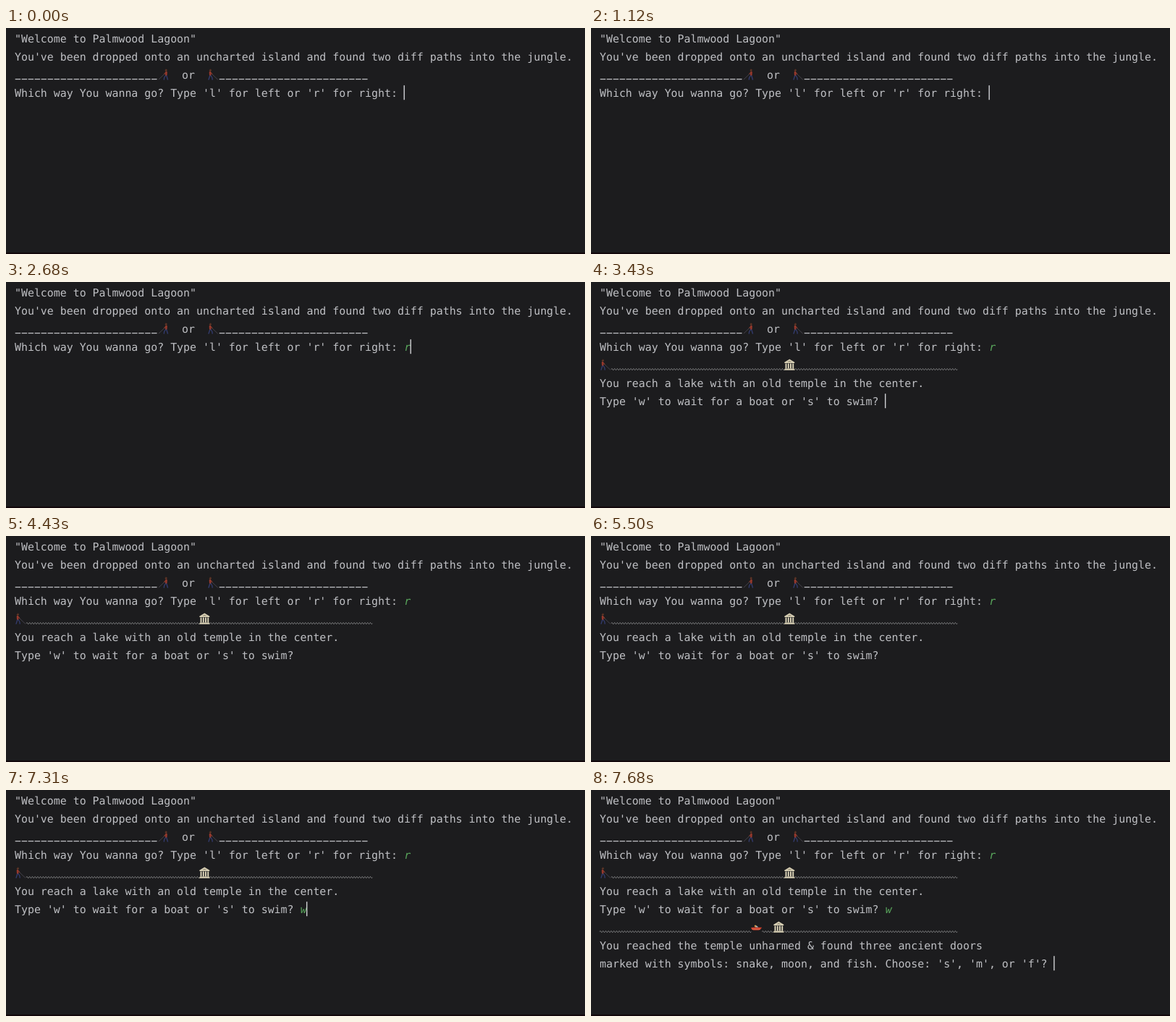
Write an HTML page that moves like this. It is 800 px wide and 312 px high and loops after 8000 ms.

```html
<!DOCTYPE html>
<html lang="en">
<head>
<meta charset="utf-8">
<title>Text adventure</title>
<style>
  html, body { margin: 0; width: 100%; height: 100%; overflow: hidden; background: #1c1c1e; }
  svg { display: block; width: 100vw; height: 100vh; }
  text {
    font: 14.9px "DejaVu Sans Mono", "Noto Sans Mono", monospace;
    text-rendering: geometricPrecision;
    fill: #bfc0c4;
    white-space: pre;
  }
  .typed { fill: #59a65c; font-style: italic; }
  .rule { stroke: #bfc0c4; stroke-width: 1.2; fill: none; }
  .wave { stroke: #a0a1a3; stroke-width: .8; fill: none; }
</style>
</head>
<body>
<svg viewBox="0 0 800 312" xmlns="http://www.w3.org/2000/svg">
  <defs>
    <g id="walker" fill="none" stroke-linecap="round">
      <path d="M6 -7 L14.4 1" stroke="#615c69" stroke-width=".6"/>
      <path d="M4 -5 L2 1.2 M4.6 -5 L6.8 -1.6 L7.2 1.2" stroke="#343c70" stroke-width="1.3"/>
      <path d="M4 -9 L4.2 -5.6" stroke="#98382c" stroke-width="2.6"/>
      <path d="M4.6 -8.8 L6.8 -6.6" stroke="#8c3b2c" stroke-width="1.1"/>
      <circle cx="4.3" cy="-11.8" r="1.4" fill="#6b3b29"/>
      <path d="M3 -12.3 Q3.8 -13.9 5.4 -13" stroke="#30221f" stroke-width="1"/>
    </g>
    <g id="temple" fill="#d8d0b5">
      <path d="M.3 -9.3 L7.3 -13.6 L14.3 -9.3 V-8 H.3 Z"/>
      <path d="M1.5 -7.4 h2 V-.6 h-2 Z M4.8 -7.4 h2 V-.6 h-2 Z M8 -7.4 h2 V-.6 h-2 Z M11.2 -7.4 h2 V-.6 h-2 Z"/>
      <path d="M.8 -.6 H13.9 V.5 H14.6 V1.8 H0 V.5 H.8 Z"/>
      <path d="M4 -9.4 L7.3 -11.6 L10.6 -9.4 Z" fill="#9c947d"/>
    </g>
    <g id="boat">
      <path d="M0 -5 L5 -5.6 L15.2 -5.2 Q13 -1.6 10.5 -1.4 H3 Q1 -2 0 -5 Z" fill="#cf3f2a"/>
      <path d="M1.2 -2.9 H12.8" stroke="#e8876b" stroke-width=".7"/>
      <path d="M6 -5.4 L7.5 -8 L10.4 -5.4 Z" fill="#a9bcc5"/>
      <circle cx="6" cy="-7.3" r="1.2" fill="#d6a24c"/>
    </g>
  </defs>
  <rect width="800" height="312" fill="#1c1c1e"/>
  <rect y="310" width="800" height="2" fill="#12070b"/>
  <g id="screen"></g>
  <rect id="caret" width="1.4" height="20" fill="#d0d1d4"/>
</svg>
<script>
const LOOP = 8000, LEFT = 12, CELL = 8.97, EM = 14.95;
const screen = document.getElementById("screen");
const caret = document.getElementById("caret");
const baseline = row => 20 + row * 25;
const column = n => LEFT + n * CELL;

// Each part becomes visible at its own time.
const parts = [];
function add(start, tag, attrs, content = "") {
  const node = document.createElementNS("http://www.w3.org/2000/svg", tag);
  for (const key in attrs) node.setAttribute(key, attrs[key]);
  node.textContent = content;
  screen.append(node);
  parts.push({ node, start });
}
const write = (start, row, content, x = LEFT, cls = "") =>
  add(start, "text", { x, y: baseline(row), class: cls }, content);

const icon = (start, row, name, x, flip = 1) =>
  add(start, "use", { href: "#" + name, transform: `translate(${x} ${baseline(row)}) scale(${flip} 1)` });

const dashes = (row, x, count) =>
  add(0, "path", {
    class: "rule",
    d: `M${x + 0.7} ${baseline(row) + 0.6}h${count * CELL - 1.4}`,
    "stroke-dasharray": `7.5 ${CELL - 7.5}`
  });

function water(start, row, x, count) {
  const q = EM / 16;
  const ripple = `q${q} -2.2 ${2 * q} 0q${q} 2.2 ${2 * q} 0`;
  add(start, "path", { class: "wave", d: `M${x} ${baseline(row) + 0.6}` + ripple.repeat(count * 4) });
}

const TYPE_R = 1680, LAKE = 2990, TYPE_W = 6180, DOORS = 7440;

write(0, 0, '"Welcome to Palmwood Lagoon"');
write(0, 1, "You've been dropped onto an uncharted island and found two diff paths into the jungle.");
dashes(2, LEFT, 22);
icon(0, 2, "walker", 225.5, -1);
write(0, 2, "or", 243);
icon(0, 2, "walker", 278);
dashes(2, 294, 23);
write(0, 3, "Which way You wanna go? Type 'l' for left or 'r' for right:");
write(TYPE_R, 3, "r", column(60), "typed");

icon(LAKE, 4, "walker", LEFT);
water(LAKE, 4, 28, 16);
icon(LAKE, 4, "temple", 267);
water(LAKE, 4, 282, 15);
write(LAKE, 5, "You reach a lake with an old temple in the center.");
write(LAKE, 6, "Type 'w' to wait for a boat or 's' to swim?");
write(TYPE_W, 6, "w", column(44), "typed");

water(DOORS, 7, LEFT, 14);
icon(DOORS, 7, "boat", 221);
water(DOORS, 7, 236.5, 1);
icon(DOORS, 7, "temple", 252);
water(DOORS, 7, 267, 16);
write(DOORS, 8, "You reached the temple unharmed & found three ancient doors");
write(DOORS, 9, "marked with symbols: snake, moon, and fish. Choose: 's', 'm', or 'f'?");

// Caret: shown from, until, row, column
const blinks = [
  [0, 180, 3, 60], [740, 1250, 3, 60],
  [TYPE_R, 2180, 3, 61], [2680, LAKE, 3, 61],
  [LAKE, 3500, 6, 44], [3980, 4430, 6, 44], [4930, 5440, 6, 44], [5930, TYPE_W, 6, 44],
  [TYPE_W, 6680, 6, 45], [7180, DOORS, 6, 45],
  [DOORS, LOOP, 9, 70]
];

function draw(t) {
  for (const { node, start } of parts) node.style.display = t >= start ? "" : "none";
  const blink = blinks.find(([from, until]) => t >= from && t < until);
  caret.style.display = blink ? "" : "none";
  if (blink) {
    caret.setAttribute("x", column(blink[3]) - 0.7);
    caret.setAttribute("y", baseline(blink[2]) - 15.8);
  }
}

const begin = performance.now();
function tick() {
  draw((performance.now() - begin) % LOOP);
  requestAnimationFrame(tick);
}
tick();
</script>
</body>
</html>
```
